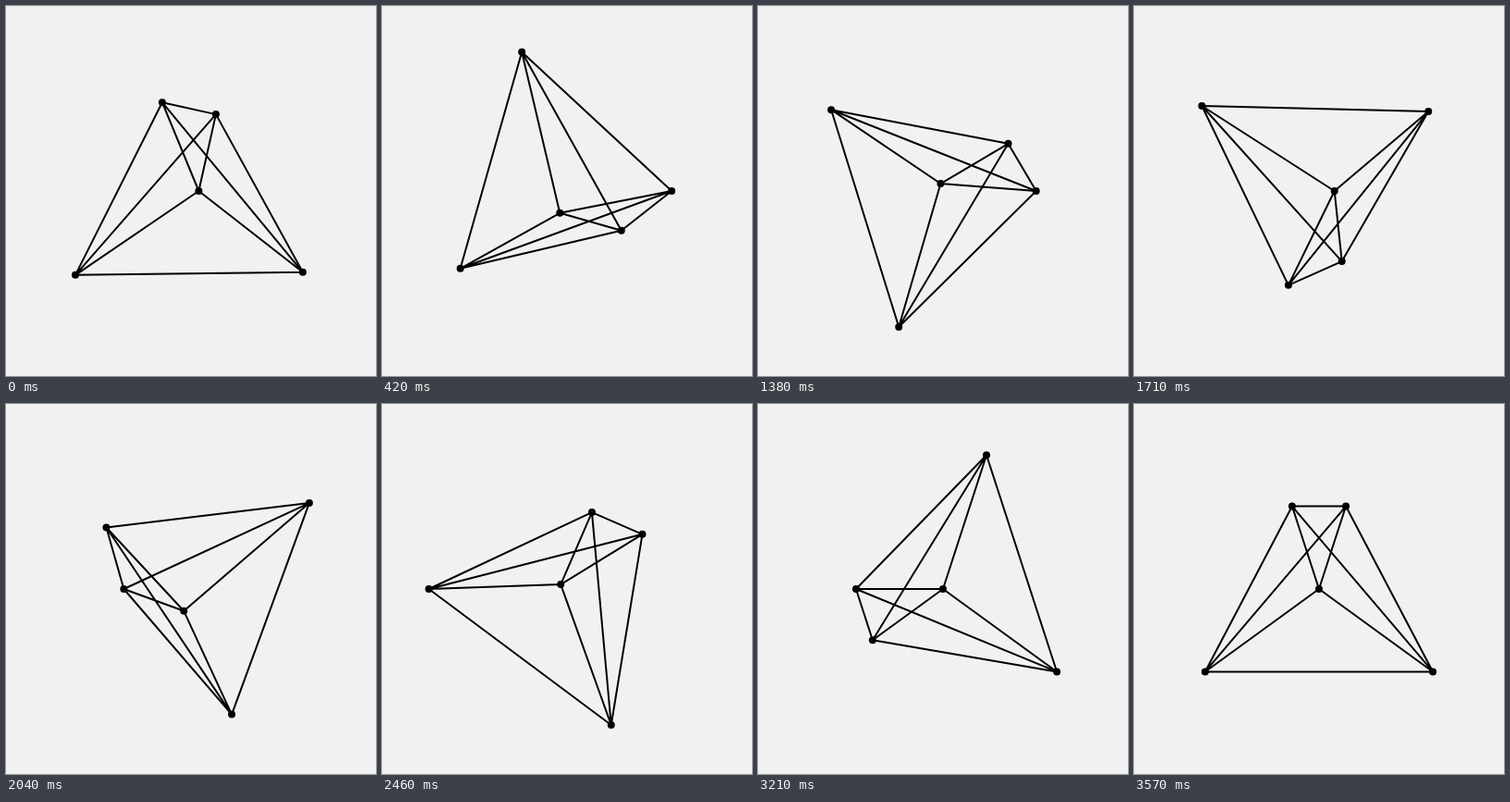
Write an HTML page with a canvas that moves like this. It is 400 px wide and 400 px high and loops after 3.6 s.

```html
<!DOCTYPE html>
<html lang="en">
<head>
<meta charset="utf-8">
<title>Five linked points</title>
<style>
  html, body { margin: 0; width: 100%; height: 100%; overflow: hidden; background: #f1f1f1; }
  canvas { display: block; }
</style>
</head>
<body>
<canvas id="stage" width="400" height="400"></canvas>
<script>
const ctx = document.getElementById('stage').getContext('2d');
const COUNT = 5, CENTER = 200, REACH = 160, DOT = 4;
const STEP_MS = 30, STEPS = 120;
const TAU = Math.PI * 2;

// Each point swings along its own fixed line through the centre.
function pointAt(k, phase) {
  const axis = k * Math.PI / COUNT;
  const r = REACH * Math.sin(phase + 3 * axis);
  return [CENTER + r * Math.cos(axis), CENTER + r * Math.sin(axis)];
}

function draw(ms) {
  const step = Math.floor(ms / STEP_MS) % STEPS;
  const phase = (step + 1) / STEPS * TAU;
  const points = Array.from({ length: COUNT }, (_, k) => pointAt(k, phase));

  ctx.fillStyle = '#f1f1f1';
  ctx.fillRect(0, 0, 400, 400);

  ctx.strokeStyle = ctx.fillStyle = '#000';
  ctx.lineWidth = 2;
  ctx.beginPath();
  points.forEach((a, i) => points.slice(i + 1).forEach(b => {
    ctx.moveTo(...a);
    ctx.lineTo(...b);
  }));
  ctx.stroke();

  for (const [x, y] of points) {
    ctx.beginPath();
    ctx.arc(x, y, DOT, 0, TAU);
    ctx.fill();
  }
}

function tick() {
  draw(performance.now() - start);
  requestAnimationFrame(tick);
}

const start = performance.now();
tick();
</script>
</body>
</html>
```
